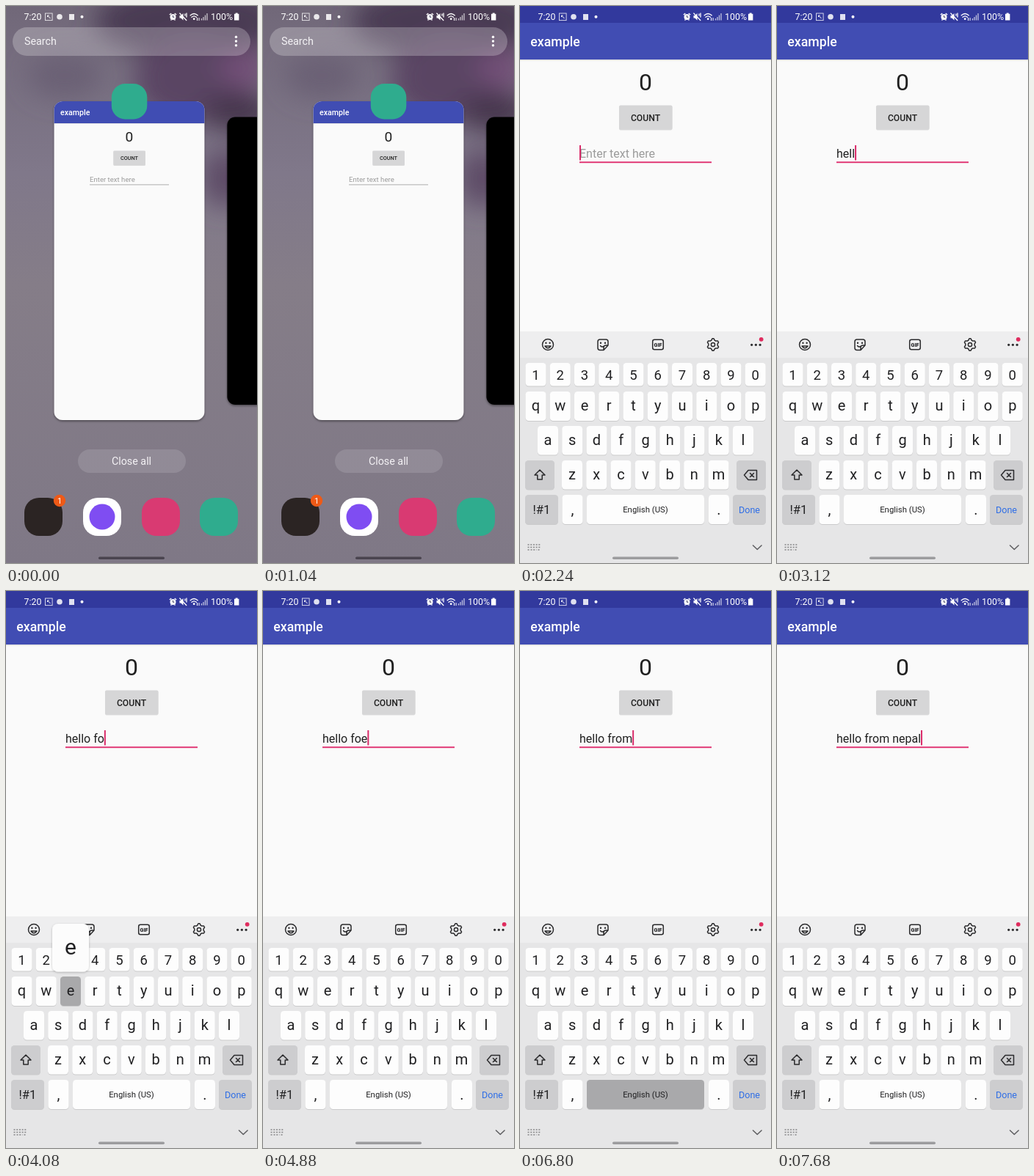
An HTML page that plays this animation: 342 by 760 pixels, repeating every 8000 ms.

```html
<!DOCTYPE html>
<html lang="en">
<head>
<meta charset="utf-8">
<title>Text input demo</title>
<style>
  html, body { margin: 0; width: 100%; height: 100%; overflow: hidden; background: #837c88; }
  svg { display: block; width: 100%; height: 100%; }
  text { font-family: Roboto, sans-serif; white-space: pre; }
  .mid { text-anchor: middle; }
  .line { fill: none; stroke: #2b2b2d; stroke-width: 1.5; stroke-linecap: round; stroke-linejoin: round; }
  .wifi { fill: none; stroke: #fff; stroke-width: 1.3; stroke-linecap: round; }
</style>
</head>
<body>
<svg viewBox="0 0 342 760" preserveAspectRatio="none">
  <defs>
    <filter id="blur" x="-60%" y="-60%" width="220%" height="220%"><feGaussianBlur stdDeviation="17"/></filter>
    <filter id="shade" x="-20%" y="-20%" width="140%" height="150%">
      <feDropShadow dx="0" dy="1.5" stdDeviation="1.8" flood-color="#000" flood-opacity=".45"/>
    </filter>
    <filter id="lift" x="-20%" y="-20%" width="140%" height="150%">
      <feDropShadow dx="0" dy="1" stdDeviation="1.5" flood-color="#000" flood-opacity=".25"/>
    </filter>
    <linearGradient id="wall" x2="0" y2="1">
      <stop offset="0" stop-color="#716879"/>
      <stop offset=".3" stop-color="#80788a"/>
      <stop offset=".5" stop-color="#857d88"/>
      <stop offset="1" stop-color="#7f7886"/>
    </linearGradient>
    <clipPath id="window"><rect id="frame"/></clipPath>
  </defs>

  <g id="recents">
    <rect width="342" height="760" fill="url(#wall)"/>
    <g filter="url(#blur)">
      <ellipse cx="250" cy="20" rx="130" ry="48" fill="#4a3a52"/>
      <ellipse cx="255" cy="100" rx="80" ry="60" fill="#5a4563"/>
      <ellipse cx="325" cy="85" rx="34" ry="26" fill="#735078"/>
      <ellipse cx="318" cy="145" rx="50" ry="26" fill="#44364c"/>
      <ellipse cx="300" cy="235" rx="34" ry="40" fill="#5d4c66"/>
      <ellipse cx="80" cy="95" rx="50" ry="30" fill="#6b6074"/>
    </g>
    <rect x="9" y="29" width="324" height="39" rx="19.5" fill="#fff" opacity=".24"/>
    <text x="25" y="53.3" font-size="14.3" fill="#f4f2f5">Search</text>
    <g fill="#fff">
      <circle cx="313.5" cy="42.3" r="1.7"/><circle cx="313.5" cy="48" r="1.7"/><circle cx="313.5" cy="53.7" r="1.7"/>
    </g>
    <rect x="98" y="605" width="147" height="32" rx="16" fill="#fff" opacity=".13"/>
    <text class="mid" x="171" y="626.3" font-size="14.3" fill="#f4f2f5">Close all</text>
    <rect x="25" y="671" width="52" height="52" rx="20" fill="#2b2423"/>
    <circle cx="73" cy="675" r="8.2" fill="#ee5a17"/>
    <text class="mid" x="73" y="679" font-size="11" fill="#fff">1</text>
    <rect x="105" y="671" width="52" height="52" rx="20" fill="#fff"/>
    <circle cx="131" cy="697" r="17.5" fill="#7f4df2"/>
    <rect x="185" y="671" width="52" height="52" rx="20" fill="#d93a72"/>
    <rect x="264" y="671" width="52" height="52" rx="20" fill="#2fac8e"/>
    <rect id="nextCard" y="151.5" width="180" height="392.5" rx="11" fill="#000" filter="url(#shade)"/>
  </g>

  <g id="shadow">
    <g id="app">
      <g clip-path="url(#window)">
        <rect width="342" height="760" fill="#fafafa"/>
        <rect id="navBar" y="746" width="342" height="14" fill="#f2f2f2"/>
        <rect y="20" width="342" height="53" fill="#414db3"/>
        <rect y="73" width="342" height="1.5" fill="#000" opacity=".1"/>
        <rect width="342" height="23" fill="#32399d"/>
        <text x="14.3" y="55" font-size="17.7" font-weight="500" fill="#fff">example</text>
        <text class="mid" x="171" y="115" font-size="32" fill="#202020">0</text>
        <rect x="135" y="136.3" width="72.5" height="33.2" rx="2" fill="#000" opacity=".12"/>
        <rect x="135" y="135.5" width="72.5" height="33" rx="2" fill="#d6d6d7"/>
        <text class="mid" x="171" y="156.8" font-size="12.2" font-weight="500" fill="#222">COUNT</text>
        <text id="field" x="81" y="206.7" font-size="16"/>
        <rect id="underline" x="81" width="180"/>
        <rect id="caret" y="190" width="2" height="20.5" fill="#d92b69"/>
      </g>
    </g>
  </g>
  <rect id="appIcon" y="106" width="48.5" height="48.5" rx="18.5" fill="#2fac8e"/>

  <g id="keyboard">
    <rect y="444" width="342" height="316" fill="#e6e6e7"/>
    <rect y="444" width="342" height="36" fill="#eeeeef"/>
    <g class="line">
      <circle cx="38" cy="462" r="7.5"/>
      <path d="M34 464 Q38 469.5 42 464 Z"/>
      <path d="M35.4 459.6 v.4 M40.6 459.6 v.4" stroke-width="2.2"/>
      <path d="M109 455 h8 q3 0 3 3 v5 l-6 6.5 h-5 q-3 0 -3 -3 v-8.500 q0 -3 3 -3 Z M120 463 h-3 q-3 0 -3 3 v3.500"/>
      <path d="M109.500 463.500 q2 2.500 4.500 1"/>
      <path d="M110 459.500 v.4 M116 459.500 v.4" stroke-width="2.2"/>
      <rect x="180.700" y="455.300" width="14.600" height="13.400" rx="2.5"/>
      <path id="gear"/>
      <circle cx="263" cy="462" r="2.6"/>
    </g>
    <text class="mid" x="188" y="464.700" font-size="7.2" font-weight="900" fill="#2b2b2d">GIF</text>
    <g fill="#2b2b2d">
      <circle cx="315.700" cy="462.300" r="1.6"/><circle cx="321.400" cy="462.300" r="1.6"/><circle cx="327.100" cy="462.300" r="1.6"/>
    </g>
    <circle cx="328.700" cy="454.800" r="2.9" fill="#df2c5e"/>
    <g id="keys"></g>
    <path class="line" d="M27 633 l-7 7 h3.800 v6 h6.400 v-6 h3.800 Z"/>
    <path class="line" d="M311 633.500 h11.500 v13 h-11.500 l-5.500 -6.500 Z M313.500 637.500 l5 5 m0 -5 l-5 5"/>
    <path d="M10.500 735 h17 M10.500 738.500 h17 M10.500 742 h2 m2 0 h8 m2 0 h2" fill="none" stroke="#858587" stroke-width="1.7" stroke-dasharray="2 1.700"/>
    <path class="line" d="M317.500 736 l5.800 5.500 l5.800 -5.500" style="stroke:#5d5d60"/>
    <g id="popup">
      <rect x="-25" y="-72" width="50" height="65.500" rx="8" fill="#fcfcfc" filter="url(#lift)"/>
      <text id="popupText" class="mid" y="-30" font-size="30" fill="#202022"/>
    </g>
  </g>

  <rect id="handle" x="126" y="751.500" width="90" height="3.400" rx="1.700"/>

  <g fill="#fff">
    <text x="24.500" y="19.300" font-size="12.4">7:20</text>
    <rect x="53.500" y="10" width="9.600" height="9.600" fill="none" stroke="#fff" stroke-width=".9" opacity=".85"/>
    <path d="M56.500 13 l4 4 m-4 -4 h2 m-2 0 v2" fill="none" stroke="#fff"/>
    <circle cx="73" cy="14.800" r="3.800" opacity=".85"/>
    <rect x="86" y="11" width="7" height="8" opacity=".85"/>
    <circle cx="103.500" cy="14.800" r="2"/>
    <circle cx="227.500" cy="15" r="4"/>
    <path d="M222.800 12 l2.500 -2 m6.900 2 l-2.500 -2 M224.500 19.500 l1 -1 m5 1 l-1 -1" stroke="#fff" stroke-width="1.4"/>
    <path d="M227.500 12.800 v2.500 h1.800" fill="none" stroke="#414162"/>
    <path d="M236.500 13 h2 l3 -3 v9.500 l-3 -3 h-2 Z"/>
    <path class="wifi" d="M236.800 10 l9 9.500 M244 11 v2 m2 -3 v5"/>
    <path class="wifi" d="M251.200 12.800 q5 -4.600 10 0 M253 15.300 q3.200 -2.800 6.400 0"/>
    <circle cx="256.200" cy="17.700" r="1.400"/>
    <path d="M260.500 16 v4 m2.500 0 v-4" stroke="#fff"/>
    <path d="M266.500 17 v2.500 m2.500 -4.500 v4.500 m2.500 -7 v7 m2.500 -9.500 v9.500" stroke="#fff" stroke-width="1.300" opacity=".7"/>
    <text x="279" y="19.300" font-size="12.4">100%</text>
    <path d="M312.700 9.600 h3 v1.200 h1.700 v8.700 h-6.400 v-8.700 h1.700 Z"/>
  </g>
</svg>
<script>
const LOOP = 8000, STEP = 80;
const NS = 'http://www.w3.org/2000/svg';
const $ = id => document.getElementById(id);
const set = (el, attrs) => { for (const k in attrs) el.setAttribute(k, attrs[k]); };
const clamp = v => Math.max(0, Math.min(1, v));
const mix = (a, b, k) => a + (b - a) * k;
const span = (t, from, length) => clamp((t - from) / length);
const easeOut = x => 1 - (1 - x) ** 3;

const pen = document.createElement('canvas').getContext('2d');
const textWidth = s => { pen.font = '16px Roboto, sans-serif'; return pen.measureText(s).width; };

// Key, press time, release time
const strokes = [
  ['h', 2400, 2560], ['e', 2640, 2720], ['l', 2880, 2960], ['l', 3040, 3120], ['o', 3280, 3360],
  [' ', 3440, 3520], ['f', 3840, 3920], ['o', 4000, 4080], ['e', 4080, 4240], ['m', 4480, 4560],
  ['<', 4800, 4880], ['<', 4960, 5120], ['<', 5200, 5360],
  ['r', 6000, 6080], ['o', 6160, 6240], ['m', 6320, 6480], [' ', 6800, 6880], ['n', 6960, 7120],
  ['e', 7200, 7280], ['p', 7360, 7440], ['a', 7520, 7600], ['l', 7600, 7680]
];
const FOCUS = 1760, BLINK = 480;

const keys = {};

function add(tag, attrs, label) {
  const el = document.createElementNS(NS, tag);
  set(el, attrs);
  if (label) el.textContent = label;
  $('keys').append(el);
  return el;
}

function addKey(name, x, y, w, h, { fill = '#fdfdfd', label = name, size = 20, drop = 6.3, ink = '#202022' } = {}) {
  add('rect', { x, y: y + 1, width: w, height: h, rx: 4.5, fill: '#000', opacity: .12 });
  const rect = add('rect', { x, y, width: w, height: h, rx: 4.5, fill });
  if (label) add('text', { class: 'mid', x: x + w / 2, y: y + h / 2 + drop, 'font-size': size, fill: ink }, label);
  keys[name] = { rect, fill, cx: x + w / 2, y };
}

function addRow(chars, x, y, h, opts) {
  [...chars].forEach((c, i) => addKey(c, x + i * 33.25, y, 28, h, opts));
}

function buildKeyboard() {
  const grey = '#cdcdcf';
  addRow('1234567890', 7.5, 487, 31.5, { size: 18.5, drop: 7.2 });
  addRow('qwertyuiop', 7.5, 526, 40);
  addRow('asdfghjkl', 24, 573, 39.5);
  addRow('zxcvbnm', 57, 620, 39.5);
  addKey('shift', 7, 620, 40, 39.5, { fill: grey, label: '' });
  addKey('<', 295, 620, 40, 39.5, { fill: grey, label: '' });
  addKey('!#1', 7, 667, 45, 40, { fill: grey, size: 16.6, drop: 6 });
  addKey(',', 57.5, 667, 28, 40, { drop: 7 });
  addKey(' ', 91, 667, 160, 40, { label: 'English (US)', size: 11.4, drop: 4 });
  addKey('.', 257, 667, 28, 40, { drop: 7 });
  addKey('Done', 290, 667, 45, 40, { fill: grey, size: 12.6, drop: 4.5, ink: '#2f6ee6' });

  const points = Array.from({ length: 24 }, (_, i) => {
    const a = (i - .5) * Math.PI / 12, r = i % 4 < 2 ? 8.2 : 6.2;
    return `${263 + r * Math.sin(a)} ${462 - r * Math.cos(a)}`;
  });
  set($('gear'), { d: `M${points.join('L')}Z` });
}

function inputState(t) {
  let text = '', held = null, last = 2080;
  for (const [key, down, up] of strokes) {
    if (t < down) break;
    last = t < up ? down : up;
    if (t < up) held = key;
    if (key === '<') text = text.slice(0, -1);
    else if (t >= up) text += key;
  }
  return { text, held, caret: t >= FOCUS && t - last < BLINK };
}

function drawWindow(t) {
  const shift = -3 * (1 - easeOut(span(t, 40, 360)));
  const open = easeOut(span(t, 1080, 345));
  const square = span(t, 1360, 160);
  const top = mix(23, 0, open), bottom = mix(748, 760, open);

  set($('app'), {
    transform: `translate(${mix(68.4 + shift, 0, open)} ${mix(116.2, 0, open)}) scale(${mix(.6, 1, open)})`
  });
  set($('frame'), { y: top, width: 342, height: bottom - top, rx: mix(20, 14, open) * (1 - square) });
  if (square < 1) set($('shadow'), { filter: 'url(#shade)' });
  else $('shadow').removeAttribute('filter');
  set($('navBar'), { opacity: open });
  set($('nextCard'), { x: 304.4 + shift + 120 * open });
  set($('appIcon'), { x: 146.8 + shift, opacity: 1 - clamp(open * 2) });
  set($('recents'), { visibility: square < 1 ? 'visible' : 'hidden' });
  set($('handle'), { fill: open > .5 ? '#9c9c9e' : '#4a444f' });
}

function drawInput(t) {
  const { text, held, caret } = inputState(t);
  const focused = t >= FOCUS;

  $('field').textContent = text || 'Enter text here';
  set($('field'), { fill: text ? '#202020' : '#9b9b9b' });
  set($('underline'), focused
    ? { y: 212.3, height: 1.9, fill: '#e0306f' }
    : { y: 212.3, height: 1.1, fill: '#858585' });
  set($('caret'), { x: 81 + textWidth(text), opacity: caret ? 1 : 0 });

  for (const name in keys) set(keys[name].rect, { fill: name === held ? '#a9a9ab' : keys[name].fill });
  const showPopup = held && held !== ' ' && held !== '<';
  set($('popup'), { visibility: showPopup ? 'inherit' : 'hidden' });
  if (showPopup) {
    set($('popup'), { transform: `translate(${keys[held].cx} ${keys[held].y})` });
    $('popupText').textContent = held;
  }

  const rise = easeOut(span(t, 1800, 400));
  set($('keyboard'), {
    transform: `translate(0 ${316 * (1 - rise)})`,
    visibility: rise > 0 ? 'visible' : 'hidden'
  });
}

function draw(now) {
  const t = Math.floor((now % LOOP) / STEP) * STEP;
  drawWindow(t);
  drawInput(t);
}

buildKeyboard();
draw(0);
const start = performance.now();
requestAnimationFrame(function tick() {
  draw(performance.now() - start);
  requestAnimationFrame(tick);
});
</script>
</body>
</html>
```
